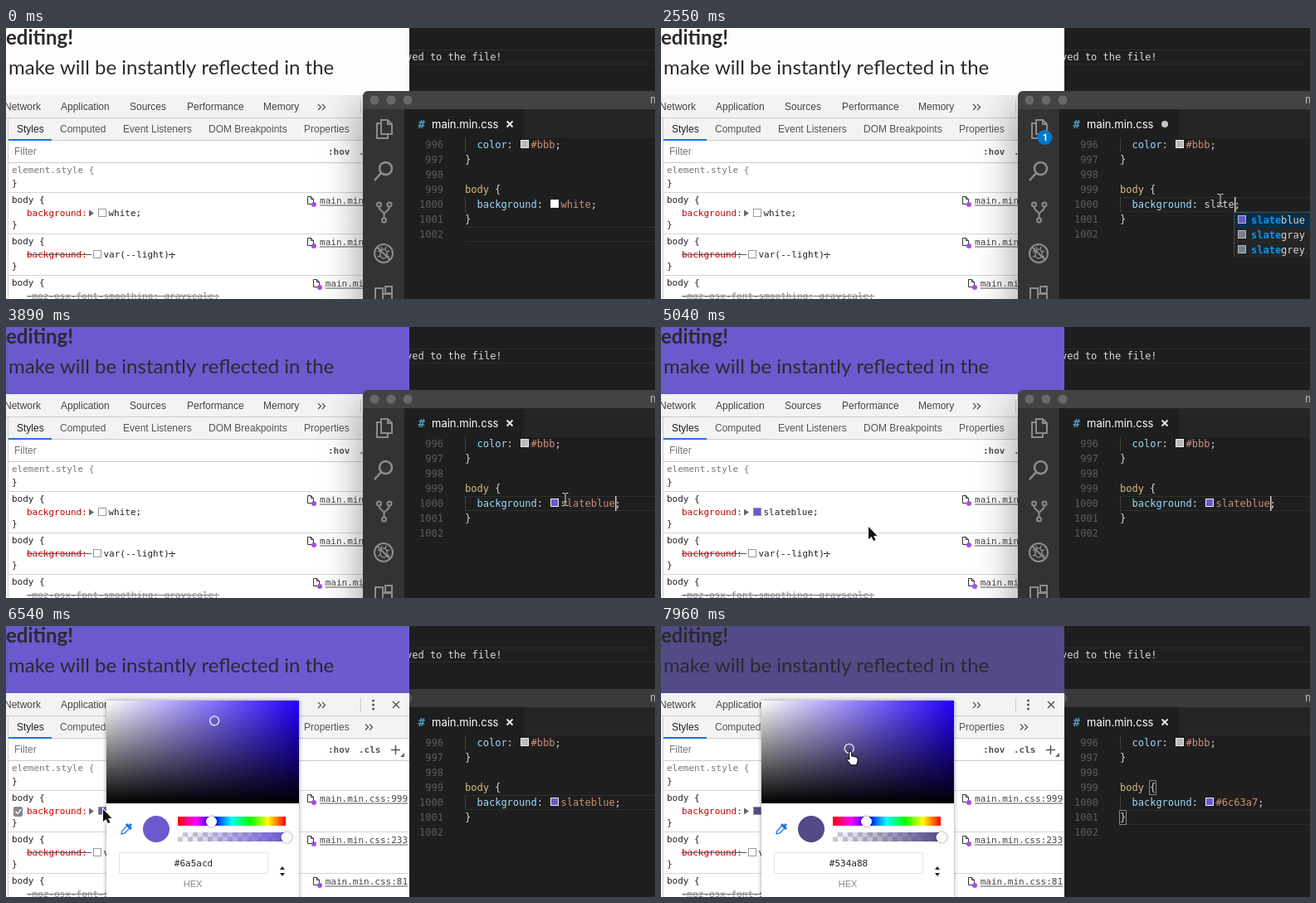
These frames come from a looping animation (782 by 327 pixels, 8 s). An HTML page with a canvas:

```html
<!DOCTYPE html>
<html lang="en">
<head>
<meta charset="utf-8">
<title>Live CSS editing</title>
<style>
html, body { margin: 0; width: 100%; height: 100%; overflow: hidden; background: #1e1e1e; }
canvas { display: block; }
</style>
</head>
<body>
<canvas id="stage" width="782" height="327"></canvas>
<script>
const ctx = document.getElementById('stage').getContext('2d');
const LOOP = 8000, TICK = 88.4;
const SANS = '12px "Liberation Sans", Arial, sans-serif';
const MONO = '11px "DejaVu Sans Mono", Menlo, monospace';
const CODE = '12px "DejaVu Sans Mono", Menlo, monospace';
const CHAR = 7.22, SLATE = '#6a5acd', VALUE_X = 654.6;

// Colour picker field
const FIELD = { x: 121, y: 90, w: 232, h: 124 };
const START = { x: 251.15, y: 114.31 };

// Pointer path: time, x, y
const PATH = [
  [262, 745, 252], [880, 676, 208], [1420, 676, 208], [1500, 674, 208], [4612, 674, 208],
  [5220, 135, 250], [5480, 113, 219], [6012, 113, 219], [6360, 117, 221], [6902, 117, 221],
  [7240, 215.47, 132.79], [7520, 215.47, 132.79], [7950, 226.76, 147.87]
];

// Typed value in the editor: start time, text
const TYPING = [[1590, 's'], [1760, 'sl'], [1850, 'sla'], [2470, 'slat'], [2550, 'slate'], [2730, 'slateblue']];
const SUGGESTIONS = [
  ['slateblue', SLATE], ['slategray', '#708090'], ['slategrey', '#708090'],
  ['saddlebrown', '#8b4513'], ['salmon', '#fa8072'], ['sandybrown', '#f4a460']
];

const between = (t, a, b) => t >= a && t < b;

function rect(x, y, w, h, color) {
  ctx.fillStyle = color;
  ctx.fillRect(x, y, w, h);
}

function text(str, x, y, color, font = CODE, align = 'left') {
  ctx.font = font;
  ctx.textAlign = align;
  ctx.fillStyle = color;
  ctx.fillText(str, x, y);
}

function disc(x, y, r, color) {
  ctx.beginPath();
  ctx.arc(x, y, r, 0, 7);
  ctx.fillStyle = color;
  ctx.fill();
}

function stroke(path, color, width = 1) {
  ctx.strokeStyle = color;
  ctx.lineWidth = width;
  ctx.stroke(new Path2D(path));
}

function fill(path, color) {
  ctx.fillStyle = color;
  ctx.fill(new Path2D(path));
}

function swatch(x, y, color, border) {
  rect(x, y, 10, 10, border);
  rect(x + 1, y + 1, 8, 8, color);
}

function clip(x, y, w, h, draw) {
  ctx.save();
  ctx.beginPath();
  ctx.rect(x, y, w, h);
  ctx.clip();
  draw();
  ctx.restore();
}

function pointer(t) {
  const i = PATH.findIndex(key => key[0] > t);
  if (i === 0) return null;
  if (i < 0) return { x: PATH.at(-1)[1], y: PATH.at(-1)[2] };
  const [t0, x0, y0] = PATH[i - 1], [t1, x1, y1] = PATH[i];
  const p = (t - t0) / (t1 - t0), e = p * p * (3 - 2 * p);
  return { x: x0 + (x1 - x0) * e, y: y0 + (y1 - y0) * e };
}

function colorAt({ x, y }) {
  const s = (x - FIELD.x) / FIELD.w, b = 255 * (1 - (y - FIELD.y) / FIELD.h);
  const g = b * (1 - s), r = g + (b - g) * 0.139;
  return '#' + [r, g, b].map(v => Math.round(v).toString(16).padStart(2, '0')).join('');
}

function drawTerminal() {
  rect(486, 0, 296, 77, '#1e1e1e');
  rect(486, 26, 296, 1, '#2b2b2b');
  rect(486, 43, 296, 1, '#2b2b2b');
  clip(486, 0, 296, 77, () => text('ved to the file!', 482, 39, '#d8d8d8'));
}

function sourceLink(label, baseline) {
  const x = 484 - label.length * 6.62, y = baseline - 9;
  text(label, x, baseline, '#444', MONO);
  rect(x, baseline + 1.5, 484 - x, 1, '#555');
  ctx.save();
  ctx.translate(Math.round(x) - 15, y);
  stroke('M.5 .5h4l3 3v6h-7zM4.5 .5v3h3', '#333');
  ctx.restore();
  disc(Math.round(x) - 7, baseline + 1, 3, '#a64de6');
}

function rule(y, selector, dim) {
  text(selector + ' {', 7, y, dim ? '#777' : '#222', MONO);
  text('}', 7, y + 30 - (dim ? 14 : 0), '#222', MONO);
}

function drawBrowser(t, picked) {
  rect(0, 0, 486, 327, '#fff');
  rect(0, 0, 486, 81, t < 3890 ? '#fdfdfd' : picked);
  text('editing!', 0, 20, '#2a2a2e', 'bold 24px Lato, sans-serif');
  text('make will be instantly reflected in the', 3, 56, '#2a2a2e', '24px Lato, sans-serif');

  rect(0, 81, 486, 54, '#f3f3f3');
  rect(0, 108, 486, 1, '#ccc');
  rect(3, 135, 483, 1, '#ccc');
  rect(3, 162, 483, 1, '#ccc');
  rect(2, 109, 1, 218, '#ccc');
  [['Network', -2], ['Application', 66], ['Sources', 149], ['Performance', 218], ['Memory', 310]]
    .forEach(([s, x]) => text(s, x, 99, '#444', SANS));
  [['Styles', 13], ['Computed', 65], ['Event Listeners', 141], ['DOM Breakpoints', 244], ['Properties', 359]]
    .forEach(([s, x], i) => text(s, x, 126, i ? '#555' : '#222', SANS));
  rect(3, 134, 52, 2, '#1a73e8');
  stroke('M376 92l3.5 3.5-3.5 3.5M381 92l3.5 3.5-3.5 3.5M433 118.5l3.5 3.5-3.5 3.5M438 118.5l3.5 3.5-3.5 3.5', '#555', 1.3);
  rect(427, 87, 1, 16, '#ccc');
  [90, 95, 100].forEach(y => disc(442.5, y, 1.5, '#555'));
  stroke('M466 91l8 8M474 91l-8 8M464 149.5h11M469.5 144v11', '#555', 1.5);
  fill('M480 153v5h-5z', '#666');

  text('Filter', 10, 153, '#757575', SANS);
  text(':hov', 388, 153, '#555', 'bold ' + MONO);
  text('.cls', 425, 153, '#555', 'bold ' + MONO);

  rule(175, 'element.style', true);
  [211, 261, 311].forEach((y, i) => {
    rect(3, y - 13, 483, 1, '#d5d5d5');
    rule(y, 'body');
    sourceLink('main.min.css:' + [999, 233, 81][i], y + 1);
  });

  const reloaded = t >= 4070;
  text('background:', 25, 227, '#c80000', MONO);
  fill('M100 219.5l6 4-6 4z', '#666');
  swatch(111, 218, reloaded ? picked : '#fff', '#999');
  text(reloaded ? (t < 7430 ? 'slateblue;' : picked + ';') : 'white;', 123.5, 227, '#222', MONO);
  text('background:', 25, 277, '#c80000', MONO);
  rect(25, 273, 78, 1, '#555');
  swatch(105, 268, '#fff', '#999');
  text('var(--light);', 117.5, 277, '#222', MONO);
  rect(196, 273, 8, 1, '#222');
  text('-moz-osx-font-smoothing: grayscale;', 25, 327, '#888', MONO);
  rect(25, 323, 232, 1, '#777');

  if (between(t, 6100, 7070)) {
    fill('M11 218h7q2 0 2 2v8q0 2-2 2h-7q-2 0-2-2v-8q0-2 2-2z', '#8a8a8a');
    stroke('M11.5 224l2.5 2.5 4-5', '#fff', 1.5);
  }
  if (t >= 6540) drawPicker(t, picked);
}

function linear(x0, y0, x1, y1, colors) {
  const g = ctx.createLinearGradient(x0, y0, x1, y1);
  colors.forEach((c, i) => g.addColorStop(i / (colors.length - 1), c));
  return g;
}

function knob(x, y) {
  ctx.save();
  ctx.shadowColor = 'rgba(0,0,0,.5)';
  ctx.shadowBlur = 3;
  disc(x, y, 6.5, '#fafafa');
  ctx.restore();
}

function drawPicker(t, picked) {
  const { x, y, w, h } = FIELD;
  ctx.save();
  ctx.shadowColor = 'rgba(0,0,0,.4)';
  ctx.shadowBlur = 5;
  rect(x, y, w, 250, '#fff');
  ctx.restore();
  rect(x, y, w, h, linear(x, 0, x + w, 0, ['#fff', '#2300ff']));
  rect(x, y, w, h, linear(0, y, 0, y + h, ['rgba(0,0,0,0)', '#000']));

  const spot = t < 7430 ? START : pointer(tickTime(t));
  ctx.beginPath();
  ctx.arc(spot.x, spot.y, 5.5, 0, 7);
  ctx.strokeStyle = '#eee';
  ctx.lineWidth = 1.3;
  ctx.stroke();

  stroke('M139 250l1-3 6-6 3 3-6 6-4 1z', '#1a73e8', 1.3);
  stroke('M145 239l6 6M148.5 241.5l2.5-2.5', '#1a73e8', 3);
  disc(181, 245, 16, picked);

  rect(207, 230, 130, 11, linear(207, 0, 337, 0, ['#f00', '#f0f', '#00f', '#0ff', '#0f0', '#ff0', '#f00']));
  for (let i = 0; i < 44; i++) {
    const col = i >> 1, row = i & 1;
    rect(207 + col * 6, 249 + row * 5.5, Math.min(6, 130 - col * 6), 5.5, (col + row) % 2 ? '#ccc' : '#fff');
  }
  rect(207, 249, 130, 11, linear(207, 0, 337, 0, [picked + '00', picked]));
  knob(247.5, 236);
  knob(338, 255);

  stroke('M136.5 273.5h179v25h-179z', '#e4e4e4');
  text(picked, 226, 290, '#222', MONO, 'center');
  text('HEX', 225, 315, '#888', '11px "Liberation Sans", Arial, sans-serif', 'center');
  fill('M330 294l3-4 3 4zM330 298l3 4 3-4z', '#222');
}

function drawActivityBar(t) {
  rect(430, 98, 50, 229, '#333');
  const gray = '#8c8c8c';
  stroke('M452 111h8l5 5v12h-13zM460 111v5h5M452 115h-5v18h13v-5', gray, 2);
  stroke('M465 169.5a7.5 7.5 0 1 1-15 0a7.5 7.5 0 1 1 15 0M452 175l-8 9', gray, 2.6);
  stroke('M452 213a2.5 2.5 0 1 1-5 0a2.5 2.5 0 1 1 5 0M464.5 213a2.5 2.5 0 1 1-5 0a2.5 2.5 0 1 1 5 0' +
    'M458 232a2.5 2.5 0 1 1-5 0a2.5 2.5 0 1 1 5 0M449.5 215.5c0 6 6 5 6 9v5M462 215.5c0 6-6 5-6 9', gray, 2);
  stroke('M466 272a11 11 0 1 1-22 0a11 11 0 1 1 22 0M447.5 264.5l15 15', gray, 2);
  stroke('M459 272.5a4 5.5 0 1 1-8 0a4 5.5 0 1 1 8 0M448 269l3 1M448 276l3-1M462 269l-3 1M462 276l-3-1M453 267l-1-3M457 267l1-3', gray, 1.5);
  stroke('M445 314h9v15h-9zM457 312h8v8h-8zM454 321h11v8h-11z', gray, 2);
  if (between(t, 1590, 3800)) {
    disc(462.5, 132, 9, '#007acc');
    text('1', 462.5, 136, '#fff', 'bold 11px Inter, sans-serif', 'center');
  }
}

function bracketBox(x, y) {
  stroke(`M${x - 0.5} ${y - 12.5}h8v17h-8z`, '#888');
}

function drawCode(t) {
  const lineY = n => 145 + (n - 996) * 18;
  const moved = t >= 7780;
  const active = t < 880 ? 1002 : between(t, 1060, 1590) ? 0 : moved ? 1001 : 1000;
  if (active) {
    rect(553, lineY(active) - 13, 229, 1, '#2e2e2e');
    rect(553, lineY(active) + 4, 229, 1, '#2e2e2e');
  }
  for (let n = 996; n <= 1002; n++) text(n, 527, lineY(n), '#5c5c5c', CODE, 'right');
  [996, 1000].forEach(n => rect(553, lineY(n) - 13, 1, 18, '#404040'));

  const white = '#d4d4d4', orange = '#ce9178', blue = '#9cdcfe';
  text('color', 567.5, 145, blue);
  text(':', 567.5 + 5 * CHAR, 145, white);
  swatch(620, 135, '#bbb', '#eee');
  text('#bbb', 632.5, 145, orange);
  text(';', 632.5 + 4 * CHAR, 145, white);
  text('}', 553, 163, white);
  text('body', 553, 199, '#d7ba7d');
  text('{', 553 + 5 * CHAR, 199, white);
  text('background', 567.5, 217, blue);
  text(':', 567.5 + 10 * CHAR, 217, white);
  text('}', 553, 235, white);
  if (moved) {
    bracketBox(589, 199);
    bracketBox(553, 235);
  }

  const typing = between(t, 1590, 3800);
  const value = t < 1590 ? 'white' : typing ? TYPING.findLast(k => k[0] <= t)[1] : moved ? '#6c63a7' : 'slateblue';
  const x = typing ? VALUE_X : VALUE_X + 14, end = x + value.length * CHAR;
  if (!typing) swatch(656, 207, t < 1590 ? '#fff' : SLATE, '#eee');
  if (between(t, 1060, 1590)) rect(x, 204, end - x, 18, '#56606d');
  text(value, x, 217, typing ? white : orange);
  text(';', end, 217, white);

  const caret = between(t, 1060, 3270) || between(t, 3800, 4250) || between(t, 4700, 5200);
  if (caret) rect(Math.round(end), 204, 1.5, 18, '#ccc');
  if (between(t, 1590, 2820)) drawSuggestions(Math.round(end), t < 2730 ? value : 'slate');
}

function drawSuggestions(x, typed) {
  if (typed === 'slate') x = 691;
  const rows = SUGGESTIONS.filter(([name]) => name.startsWith(typed));
  rect(x - 1, 222, 200, rows.length * 18 + 1, '#454545');
  rows.forEach(([name, color], i) => {
    const y = 223 + i * 18;
    rect(x, y, 200, 18, i ? '#252526' : '#062f4a');
    swatch(x + 4, y + 3, color, '#bbb');
    text(typed, x + 20, y + 13, '#0097fb', 'bold ' + CODE);
    text(name.slice(typed.length), x + 20 + typed.length * CHAR, y + 13, white = '#d4d4d4');
  });
}
let white;

function drawEditor(t, focused) {
  const frame = new Path2D();
  frame.roundRect(430, 76, 400, 300, 6);
  clip(0, 81, 486, 246, () => {
    ctx.shadowColor = 'rgba(0,0,0,.42)';
    ctx.shadowBlur = 50;
    ctx.shadowOffsetY = 18;
    ctx.fillStyle = '#333';
    ctx.fill(frame);
  });
  ctx.save();
  ctx.clip(frame);
  rect(430, 76, 352, 22, focused ? '#434343' : '#3a3a3a');
  [444, 464, 484].forEach(x => disc(x, 87, 5.5, focused ? '#686868' : '#555'));
  text('main.min.css', 776, 91, '#bbb', '13px Inter, sans-serif');
  rect(480, 98, 302, 229, '#1e1e1e');
  rect(624, 98, 158, 35, '#252526');
  drawActivityBar(t);
  text('#', 496.5, 121, '#519aba', 'bold 14px "DejaVu Sans Mono", monospace');
  text('main.min.css', 513, 121, '#fff', '13px Inter, sans-serif');
  if (between(t, 1590, 3530)) disc(607, 116, 4, '#c5c5c5');
  else stroke('M603.5 112.5l7 7M610.5 112.5l-7 7', '#eee', 1.8);
  drawCode(t);
  ctx.restore();
}

function drawPointer(t) {
  const p = pointer(tickTime(t));
  if (!p) return;
  ctx.save();
  ctx.translate(p.x, p.y);
  if (p.x > 480) {
    const beam = 'M-3.5-7.5h2.5l1 1 1-1h2.5M0-7v14M-3.5 7.5h2.5l1-1 1 1h2.5M-2 3h4';
    stroke(beam, '#222', 2.6);
    stroke(beam, '#ddd', 1);
  } else if (t >= 6540 && p.x > FIELD.x && p.y < FIELD.y + FIELD.h) {
    const hand = 'M0 4q2-2 3 0v5l5 1q3 1 2.5 4l-1.5 6h-7l-5-6.500q0-2 3-.5z';
    fill(hand, '#fff');
    stroke(hand, '#111', 1.2);
  } else {
    const arrow = 'M0 0v15l3.5-3 2.500 5 2.500-1-2.500-5h4.500z';
    stroke(arrow, '#fff', 2);
    fill(arrow, '#111');
  }
  ctx.restore();
}

function tickTime(t) {
  return Math.floor((t + 14) / TICK) * TICK;
}

function draw(t) {
  const picked = t < 7430 ? SLATE : colorAt(pointer(tickTime(t)));
  const browserFront = t >= 5570;
  drawTerminal();
  if (browserFront) {
    drawEditor(t, false);
    clip(0, 0, 486, 327, () => drawBrowser(t, picked));
  } else {
    clip(0, 0, 486, 327, () => drawBrowser(t, picked));
    drawEditor(t, true);
  }
  drawPointer(t);
}

function loop() {
  draw(performance.now() % LOOP);
  requestAnimationFrame(loop);
}
loop();
</script>
</body>
</html>
```
